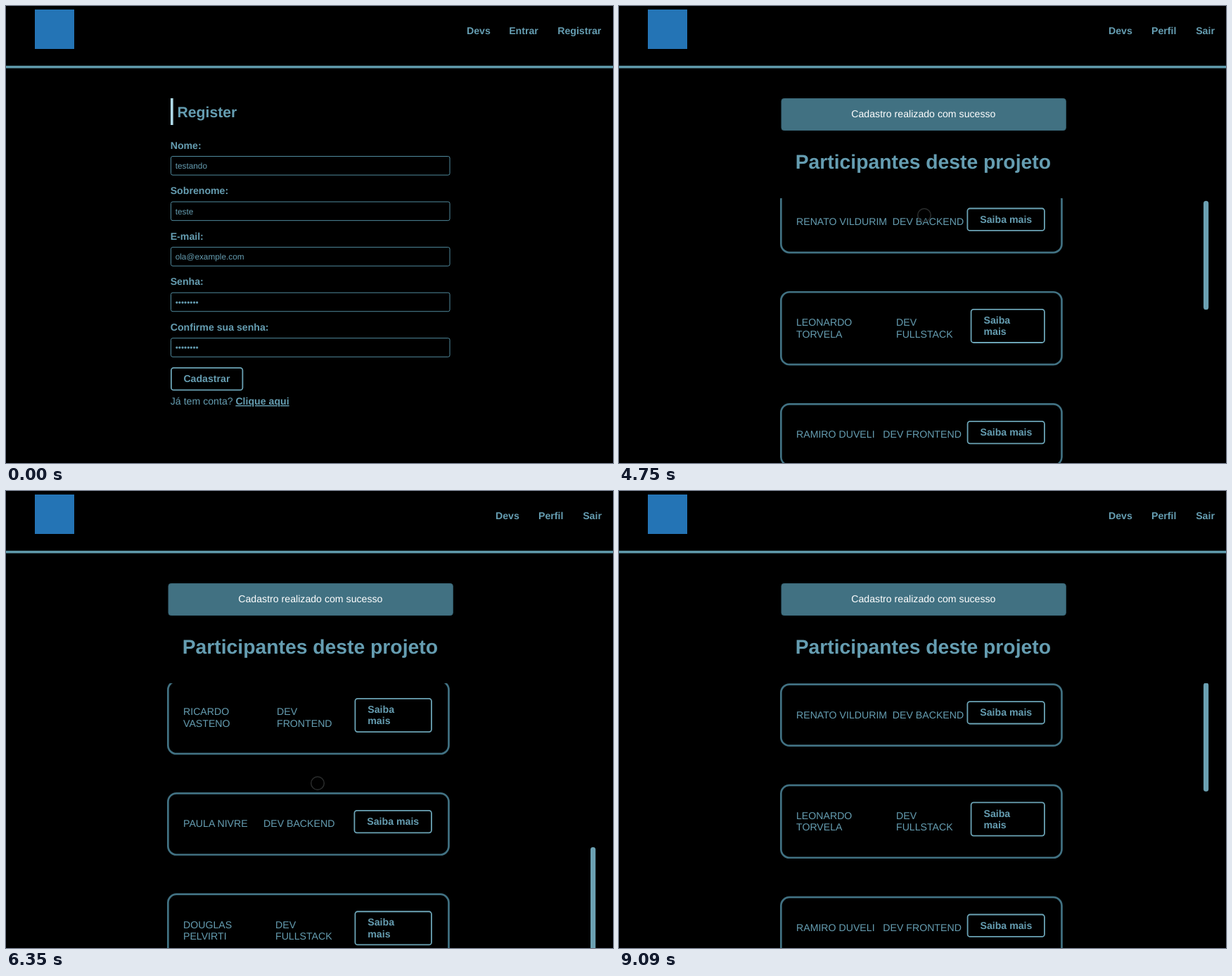
Write an HTML page that moves like this. It is 863x649 px and loops after 9560 ms.

```html
<!DOCTYPE html>
<html lang="pt-BR">
<head>
<meta charset="utf-8">
<title>Cadastro</title>
<style>
  html, body { margin: 0; width: 100%; height: 100%; overflow: hidden; background: #000; }
  svg { display: block; width: 863px; height: 649px; }
  text {
    font: 14.15px "Liberation Sans", Arial, sans-serif;
    fill: #659db1; text-rendering: geometricPrecision; white-space: pre;
  }
  .bold { font-weight: bold; }
  .link { font-weight: bold; text-decoration: underline; }
  .value { font-size: 11.8px; }
  .h1 { font-size: 28.3px; font-weight: bold; }
  .h2 { font-size: 21.2px; font-weight: bold; }
  .notice { fill: #fff; }
  .field { fill: none; stroke: #508a9d; stroke-width: 1; }
  .button { fill: none; stroke: #6ba3b5; stroke-width: 1.8; }
  .card { fill: none; stroke: #417182; stroke-width: 2.7; }
</style>
</head>
<body>
<svg id="stage" viewBox="0 0 863 649"></svg>
<script>
const LOOP = 9560, LOGIN_AT = 2790, LIST_TOP = 273.2, LINE = 16.2;

const text = (x, y, str, cls = '') => `<text x="${x}" y="${y}" class="${cls}">${str}</text>`;
const lines = (x, y, str, cls) =>
  str.split('/').map((part, i) => text(x, y + i * LINE, part, cls)).join('');
// Box given by its outer edges; the stroke is drawn inside them.
const box = (cls, left, top, right, bottom, radius, stroke) =>
  `<rect class="${cls}" x="${left + stroke / 2}" y="${top + stroke / 2}" rx="${radius}"
    width="${right - left - stroke}" height="${bottom - top - stroke}"/>`;

const fields = [
  ['Nome:', 'testando'],
  ['Sobrenome:', 'teste'],
  ['E-mail:', 'ola@example.com'],
  ['Senha:', '••••••••'],
  ['Confirme sua senha:', '••••••••'],
];

// name, role, role x, button left edge; "/" marks a line break
const people = [
  ['RENATO VILDURIM', 'DEV BACKEND', 388.8, 494.5],
  ['LEONARDO/TORVELA', 'DEV/FULLSTACK', 394, 499.7],
  ['RAMIRO DUVELI', 'DEV FRONTEND', 375.3, 494.7],
  ['CAIO TRELVI', 'DEV FRONTEND', 359.3, 494.7],
  ['RICARDO/VASTENO', 'DEV/FRONTEND', 385, 495.5],
  ['PAULA NIVRE', 'DEV BACKEND', 366, 494.5],
  ['DOUGLAS/PELVIRTI', 'DEV/FULLSTACK', 383, 495.5],
];

const registerPage = () => text(655, 40, 'Devs', 'bold') + text(715.2, 40, 'Entrar', 'bold') +
  text(784.2, 40, 'Registrar', 'bold') +
  '<rect x="234" y="131" width="3.7" height="38" fill="#add8e6"/>' +
  text(243.5, 157.5, 'Register', 'h2') +
  fields.map(([label, value], i) => {
    const y = 64.55 * i;
    return text(233.7, 202.6 + y, label, 'bold') +
      box('field', 234, 213 + y, 631.5, 240.6 + y, 2.5, 1) +
      text(240.7, 231 + y, value, 'value');
  }).join('') +
  box('button', 234, 513, 337.3, 546.3, 3.5, 1.8) + text(252.4, 534, 'Cadastrar', 'bold') +
  text(233.8, 566, 'Já tem conta?') + text(326.4, 566, 'Clique aqui', 'link');

function cards() {
  let top = LIST_TOP;
  return people.map(([name, role, roleX, left]) => {
    const extra = name.includes('/') ? 15.8 : 0;
    const card = box('card', 229, top, 630.8, top + 89.8 + extra, 12, 2.7) +
      lines(252, top + 49.4, name) + lines(roleX, top + 49.4, role) +
      box('button', left, top + 25, 605.8, top + 58.2 + extra, 3.5, 1.8) +
      lines(left + 18.8, top + 46, extra ? 'Saiba/mais' : 'Saiba mais', 'bold');
    top += 143.3 + extra;
    return card;
  }).join('');
}

const listPage = () => text(696, 40, 'Devs', 'bold') + text(757, 40, 'Perfil', 'bold') +
  text(820.2, 40, 'Sair', 'bold') +
  '<rect x="231" y="131.5" width="404.3" height="45" rx="3.5" fill="#417182" stroke="#386575"/>' +
  text(330.3, 158.3, 'Cadastro realizado com sucesso', 'notice') +
  text(250.7, 230.7, 'Participantes deste projeto', 'h1') +
  `<g clip-path="url(#view)"><g id="list">${cards()}</g>
   <rect id="thumb" x="831" width="7.2" height="154.5" rx="3.6" fill="#6ba0b2"/></g>`;

document.getElementById('stage').innerHTML = `
  <clipPath id="view"><rect x="0" y="273" width="863" height="376"/></clipPath>
  <rect x="41" y="5" width="56" height="56" fill="#2474b5"/>
  <rect y="84.8" width="863" height="3.6" fill="#5f99aa"/>
  <g id="register">${registerPage()}</g>
  <g id="members">${listPage()}</g>
  <g id="cursor">
    <circle r="9.3" fill="#000" fill-opacity=".3" stroke="#2a2c2c" stroke-width="1.5"/>
    <circle id="click" r="10.3" fill="#ff0"/>
  </g>`;

const [register, members, list, thumb, cursor, click] =
  ['register', 'members', 'list', 'thumb', 'cursor', 'click'].map(id => document.getElementById(id));

// Rows of [time, value, ...]
const cursorPath = [
  [180, 830, 630], [450, 640, 430], [700, 465, 278], [850, 345, 238], [960, 285, 235],
  [1130, 317, 400], [1420, 317, 400], [1960, 295, 525], [2790, 295, 525],
  [3200, 398, 357], [3740, 480, 190], [3950, 418, 182], [4150, 425, 225], [4500, 434, 297],
  [4750, 434, 297], [5450, 438, 343], [5640, 439, 360], [5860, 439, 360], [6190, 443, 415],
  [6350, 443, 415], [6730, 441, 408], [6870, 441, 408], [7140, 439, 403], [7450, 610, 220],
  [7820, 771, 41.5], [8370, 771, 41.5], [8700, 810, 260], [9090, 850, 662],
];
const scrollPath = [
  [4720, 0], [4750, 11], [5100, 225], [5450, 436], [5640, 530], [5860, 530], [6190, 605],
  [6320, 605], [6350, 594], [6730, 300], [6870, 300], [7130, 0],
];

// Smooth curve through the rows, at rest wherever a value repeats.
function sample(path, t, column) {
  const last = path.length - 1;
  if (t <= path[0][0]) return path[0][column];
  if (t >= path[last][0]) return path[last][column];
  const i = path.findIndex(row => row[0] > t) - 1;
  const slope = k => {
    if (k === 0 || k === last) return 0;
    const [a, b, c] = [path[k - 1], path[k], path[k + 1]];
    if ((b[column] - a[column]) * (c[column] - b[column]) <= 0) return 0;
    return (c[column] - a[column]) / (c[0] - a[0]);
  };
  const [p, q] = [path[i], path[i + 1]];
  const span = q[0] - p[0], u = (t - p[0]) / span, v = 1 - u;
  return v * v * (1 + 2 * u) * p[column] + u * u * (3 - 2 * u) * q[column] +
    span * u * v * (v * slope(i) - u * slope(i + 1));
}

function draw() {
  const t = performance.now() % LOOP;
  const loggedIn = t >= LOGIN_AT;
  register.style.display = loggedIn ? 'none' : '';
  members.style.display = loggedIn ? '' : 'none';

  const scroll = sample(scrollPath, t, 1);
  list.setAttribute('transform', `translate(0 ${-scroll})`);
  thumb.setAttribute('y', 272.3 + 0.3935 * scroll);

  cursor.style.display = t >= 180 && t < 9090 ? '' : 'none';
  cursor.setAttribute('transform', `translate(${sample(cursorPath, t, 1)} ${sample(cursorPath, t, 2)})`);
  const fade = Math.min(1, Math.max(0, (2600 - t) / 280));
  click.setAttribute('opacity', t >= 2255 ? 0.54 * fade : 0);
  requestAnimationFrame(draw);
}
draw();
</script>
</body>
</html>
```
